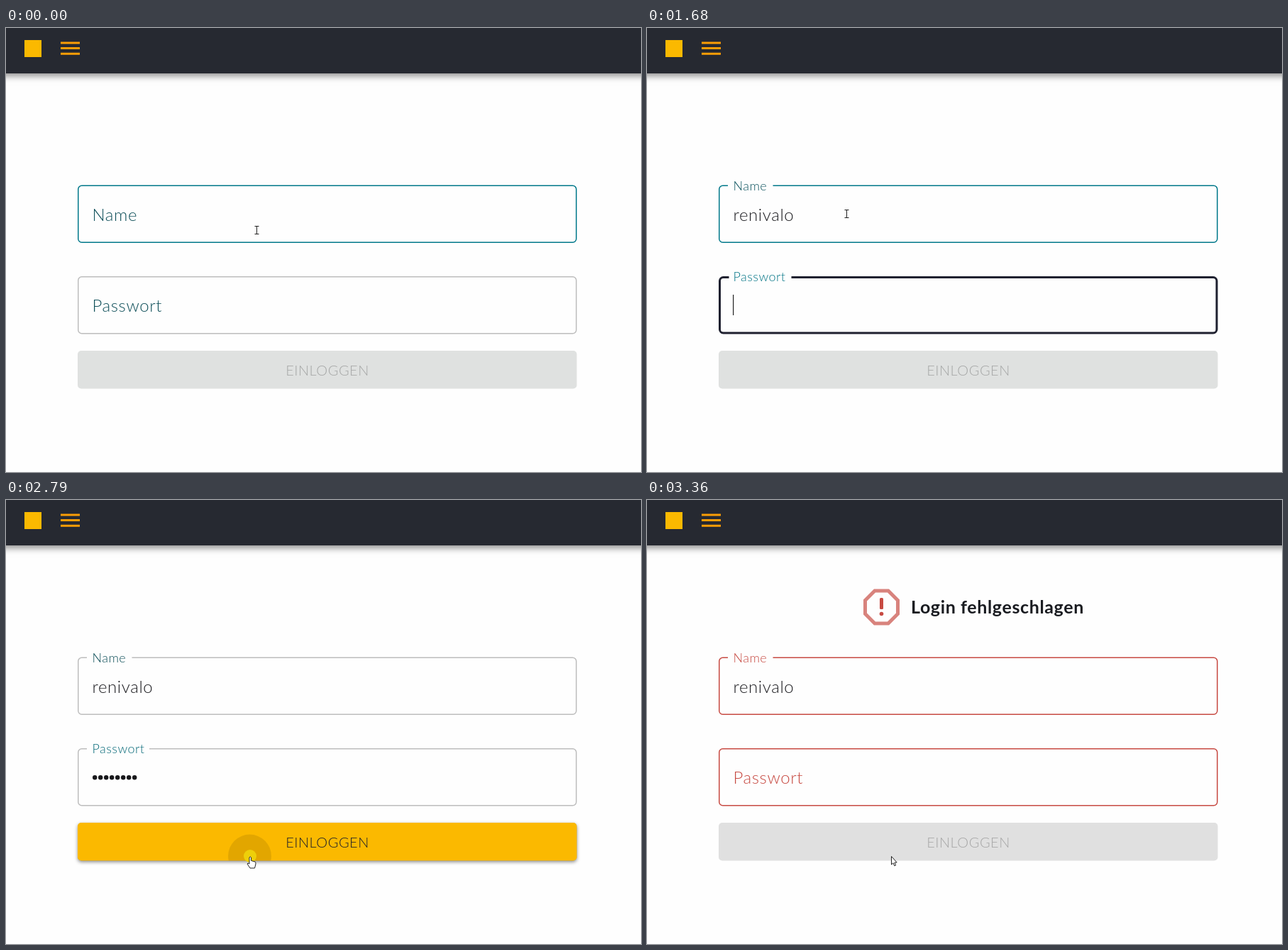
Animation of 895x626 px, one loop 3.42 s. Source, as an HTML page with a canvas:

```html
<!DOCTYPE html>
<html lang="de">
<head>
<meta charset="utf-8">
<title>Login</title>
<style>
html, body { margin: 0; height: 100%; overflow: hidden; background: #fefefe; }
canvas { display: block; }
</style>
</head>
<body>
<canvas id="stage" width="895" height="626"></canvas>
<script>
const ctx = document.getElementById('stage').getContext('2d');
const LOOP = 3420, FOCUS_NAME = 320, FOCUS_PASS = 1500, PRESS = 2715, FAIL = 2940, RESET = 3000;
const USER = 'renivalo';
const TEAL = [0, 120, 138], INK = [16, 80, 90], SLATE = [86, 112, 122], RED = [199, 74, 66];
const GRAY = [189, 189, 189], DARK = [31, 33, 48], YELLOW = '#fbb900';

const STEPS = [0, 80, 160, 240, 320, 400, 480, 560, 630, 850, 920, 1000, 1070, 1160, 1240, 1320,
  1410, 1500, 1590, 1680, 1750, 1820, 1900, 2050, 2120, 2190, 2220, 2310, 2390, 2480, 2560,
  2650, 2720, 2790, 2870, 2940, 3020, 3120, 3170, 3270, 3360];
const USER_KEYS = [850, 920, 1000, 1070, 1160, 1240, 1320, 1410];
const PASS_KEYS = [1750, 1820, 1900, 2050, 2120, 2190, 2310, 2390];
const MOUSE = [[80, 353, 285], [320, 281, 262], [1980, 281, 262], [2190, 298, 347],
  [2480, 341, 482], [2560, 344, 496], [2650, 344, 502]];

const ramp = (t, a, b) => Math.min(1, Math.max(0, (t - a) / (b - a)));
const easeOut = k => 1 - (1 - k) ** 3;
const smooth = k => k * k * (3 - 2 * k);
const rgb = c => `rgb(${c})`;
const mix = (a, b, k) => rgb(a.map((v, i) => Math.round(v + (b[i] - v) * k)));
const typed = (keys, t) => keys.filter(k => k <= t).length;

function mouseAt(t) {
  const i = MOUSE.findIndex(p => p[0] > t);
  if (i === 0) return MOUSE[0].slice(1);
  if (i < 0) return MOUSE.at(-1).slice(1);
  const [a, ax, ay] = MOUSE[i - 1], [b, bx, by] = MOUSE[i], k = ramp(t, a, b);
  return [ax + (bx - ax) * k, ay + (by - ay) * k];
}

function text(str, x, y, size, color, weight = 300, align = 'left') {
  ctx.font = `${weight} ${size}px Lato, sans-serif`;
  ctx.letterSpacing = size * 0.025 + 'px';
  ctx.textAlign = align;
  ctx.fillStyle = color;
  ctx.fillText(str, x, y);
  return ctx.measureText(str).width;
}

function roundRect(x, y, w, h, r) {
  ctx.beginPath();
  ctx.roundRect(x, y, w, h, r);
}

function disc(x, y, r, color) {
  ctx.fillStyle = color;
  ctx.beginPath();
  ctx.arc(x, y, r, 0, 7);
  ctx.fill();
}

function shadow(color, blur, dy) {
  ctx.shadowColor = color;
  ctx.shadowBlur = blur;
  ctx.shadowOffsetY = dy;
}

function polygon(points) {
  ctx.beginPath();
  points.forEach(p => ctx.lineTo(...p));
  ctx.closePath();
}

function header() {
  ctx.save();
  shadow('rgba(0,0,0,.5)', 10, 3);
  ctx.fillStyle = '#262931';
  ctx.fillRect(-20, -20, 935, 84);
  ctx.restore();
  ctx.fillStyle = YELLOW;
  ctx.fillRect(26, 17, 24, 24);
  ctx.fillStyle = '#fb9d06';
  for (const y of [19.5, 27, 34.8]) ctx.fillRect(77, y, 27, 3);
}

function field(top, label, notch, lift, border, focused, labelColor) {
  const line = focused ? 3 : 1.5;
  ctx.strokeStyle = border;
  ctx.lineWidth = line;
  roundRect(101 + line / 2, top + line / 2, 703.5 - line, 81.5 - line, 5);
  ctx.stroke();
  if (lift > 0) {
    ctx.fillStyle = '#fefefe';
    ctx.fillRect(focused ? 115.5 : 114, top - 1, notch * Math.min(1, lift * 2), 5);
  }
  text(label, 121.5, top + 50 - 43 * lift, 24 - 6 * lift, labelColor);
}

function caret(x, y) {
  ctx.fillStyle = '#222';
  ctx.fillRect(x, y, 1.2, 29);
}

function button(t) {
  const on = ramp(t, 1750, 2000) * (1 - ramp(t, 3020, 3260));
  ctx.fillStyle = t < FAIL ? '#dfe1e0' : '#e0e0e0';
  roundRect(101, 455, 703.5, 53.5, 5);
  ctx.fill();
  ctx.save();
  ctx.globalAlpha = on;
  shadow('rgba(0,0,0,.45)', 5, 2);
  ctx.fillStyle = YELLOW;
  ctx.fill();
  ctx.restore();
  if (t >= PRESS && t < RESET) {
    ctx.save();
    ctx.clip();
    const fade = 1 - ramp(t, 2870, 3010);
    disc(343.5, 502, 600 * smooth(ramp(t, PRESS, PRESS + 550)), `rgba(0,0,0,${0.1 * fade})`);
    ctx.restore();
  }
  const enabled = t >= 1750 && t < RESET;
  text('EINLOGGEN', 453, 489.5, 20, enabled ? '#20222a' : 'rgba(0,0,0,.26)', 300, 'center');
}

function failure(t) {
  const k = ramp(t, FAIL, 3360), r = 21.6 + 1.4 * k, c = r * 0.414;
  ctx.save();
  ctx.translate(330.5, 151);
  ctx.globalAlpha = 0.95 - 0.27 * k;
  ctx.strokeStyle = rgb(RED);
  ctx.lineWidth = 5;
  polygon([[-c, -r], [c, -r], [r, -c], [r, c], [c, r], [-c, r], [-r, c], [-r, -c]]);
  ctx.stroke();
  ctx.globalAlpha = 1;
  ctx.fillStyle = rgb(RED);
  roundRect(-2.5, -13, 5, 16, 1.5);
  ctx.fill();
  disc(0, 9.5, 2.8, rgb(RED));
  ctx.restore();
  text('Login fehlgeschlagen', 372, 160, 25, '#191b20', 700);
}

function pointer(x, y, t) {
  ctx.save();
  ctx.translate(x, y);
  ctx.strokeStyle = '#222';
  ctx.fillStyle = '#fff';
  ctx.lineWidth = 1;
  if ((y > 221 && y < 303) || (y > 350 && y < 432)) {
    ctx.beginPath();
    for (const s of [-1, 1]) {
      ctx.moveTo(-2.5, 5.5 * s);
      ctx.lineTo(3.5, 5.5 * s);
    }
    ctx.moveTo(0.5, -5.5);
    ctx.lineTo(0.5, 5.5);
    ctx.stroke();
  } else if (y > 455 && t < FAIL) {
    ctx.beginPath();
    ctx.moveTo(-1, 10);
    ctx.lineTo(-1, 2);
    ctx.quadraticCurveTo(0.3, 0, 1.6, 2);
    ctx.lineTo(1.6, 6.5);
    ctx.lineTo(7, 8);
    ctx.quadraticCurveTo(8.5, 9, 7.8, 12);
    ctx.lineTo(6.5, 17);
    ctx.lineTo(0, 17);
    ctx.lineTo(-4, 11);
    ctx.quadraticCurveTo(-3.5, 9, -1, 11);
    ctx.closePath();
    ctx.fill();
    ctx.stroke();
  } else {
    polygon([[0.5, 0.5], [0.5, 12], [3, 9.8], [4.8, 13.8], [6.6, 13], [4.9, 9.2], [8.2, 9]]);
    ctx.fill();
    ctx.stroke();
  }
  ctx.restore();
}

function draw(t) {
  const [x, y] = mouseAt(t), failed = t >= FAIL;
  const onName = t >= FOCUS_NAME && t < FOCUS_PASS, onPass = t >= FOCUS_PASS && t < PRESS;
  const lift = start => easeOut(ramp(t, start, start + 200));
  const drop = easeOut(ramp(t, RESET, RESET + 200));
  const labelColor = (start, end) => failed
    ? mix(SLATE, RED, ramp(t, 3020, 3260))
    : mix(INK, TEAL, ramp(t, start, start + 200) * (1 - ramp(t, end, end + 200)));

  ctx.fillStyle = '#fefefe';
  ctx.fillRect(0, 0, 895, 626);
  header();
  if (failed) failure(t);

  const nameBorder = failed ? RED : onName || y < 303 ? TEAL : GRAY;
  const passBorder = failed ? RED : onPass ? DARK : GRAY;
  field(221.5, 'Name', 63.5, lift(FOCUS_NAME), rgb(nameBorder), onName,
    labelColor(FOCUS_NAME, FOCUS_PASS));
  field(350, 'Passwort', 88, lift(FOCUS_PASS) * (1 - drop), rgb(passBorder), onPass,
    labelColor(FOCUS_PASS, PRESS));

  const nameWidth = text(USER.slice(0, typed(USER_KEYS, t)), 121.5, 271.5, 24, '#1c1c20');
  const dots = failed ? 0 : typed(PASS_KEYS, t);
  for (let i = 0; i < dots; i++) disc(125.2 + 8 * i, 391.3, 3.2, '#18181b');
  if (onName) caret(121 + nameWidth, 248);
  if (onPass) caret(121 + 8 * dots, 376);

  button(t);
  if (t >= PRESS && t < 2870) disc(344, 502, 9, '#eecf0a');
  pointer(x, y, t);
}

function tick(now) {
  const t = now % LOOP;
  draw(STEPS.findLast(s => s <= t) ?? 0);
  requestAnimationFrame(tick);
}
tick(performance.now());
</script>
</body>
</html>
```
